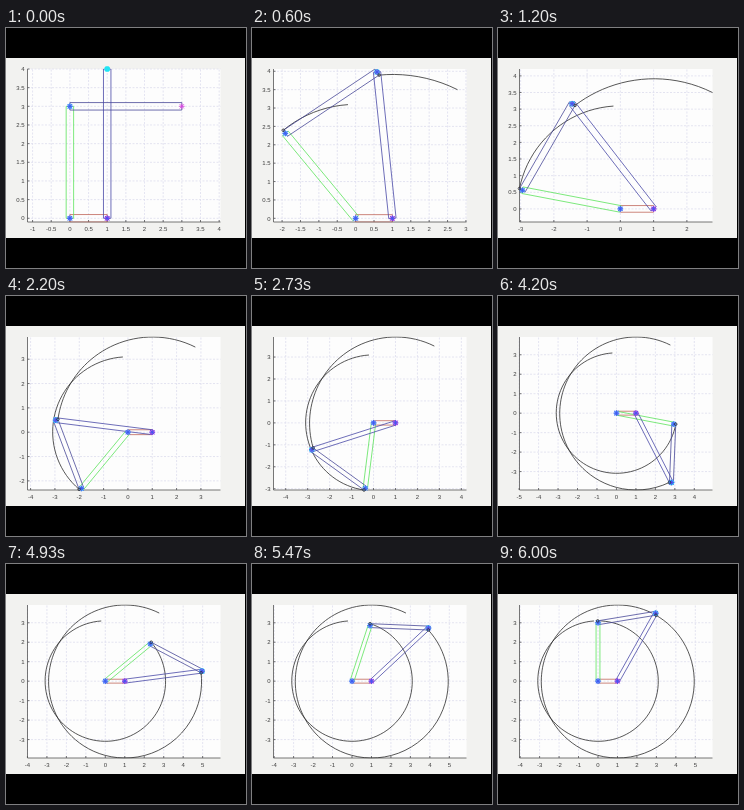
These frames come from a looping animation (240x240 px, 6.07 s). An HTML page:

```html
<!DOCTYPE html>
<html lang="en">
<head>
<meta charset="utf-8">
<title>Four-bar linkage</title>
<style>
  html, body { margin: 0; width: 100%; height: 100%; overflow: hidden; background: #000; }
  svg { display: block; width: 100vw; height: 100vh; }
  text { font: 6px "Liberation Sans", Arial, sans-serif; fill: #3a3a3a; }
  path, polyline, circle { fill: none; }
  .grid { stroke: #dedeee; stroke-width: .8; stroke-dasharray: 2 1.5; }
  .axis { stroke: #555; stroke-width: .8; }
  .trace { stroke: #2c2c2c; stroke-width: .8; }
  .bar { stroke-width: .8; }
</style>
</head>
<body>
<svg viewBox="0 0 240 240">
  <rect width="240" height="240" fill="#000"/>
  <rect y="30" width="239" height="180" fill="#f2f2f0"/>
  <rect x="21.5" y="41" width="193" height="153" fill="#fdfdfd"/>
  <clipPath id="box"><rect x="21" y="40.5" width="194" height="154"/></clipPath>
  <g id="axes"></g>
  <g id="plot" clip-path="url(#box)"></g>
  <g id="marks"></g>
</svg>
<script>
const LOOP = 6070, TICK = 200 / 3, STEPS = 100;
const BOX = { x: 21.5, y: 41, w: 193, h: 153 };
const CRANK = 3, COUPLER = 3, ROCKER = 4, HALF = 0.1;
const ORIGIN = [0, 0], PIVOT = [1, 0];

// Simulation step reached at selected ticks
const PACE = [[0, 0], [1, 2], [18, 22], [33, 39], [50, 58], [63, 72], [74, 86], [87, 100], [90, 100]];

const axes = document.getElementById('axes');
const plot = document.getElementById('plot');
const marks = document.getElementById('marks');

function stepAt(tick) {
  const i = Math.max(1, PACE.findIndex(p => p[0] >= tick));
  const [a, m] = PACE[i - 1], [b, n] = PACE[i];
  return Math.round(m + (n - m) * (tick - a) / (b - a));
}

function pose(n) {
  const angle = Math.PI / 2 + n / STEPS * 2 * Math.PI;
  const A = [CRANK * Math.cos(angle), CRANK * Math.sin(angle)];
  const dx = PIVOT[0] - A[0], dy = PIVOT[1] - A[1], d = Math.hypot(dx, dy);
  const along = (COUPLER ** 2 - ROCKER ** 2 + d * d) / (2 * d);
  const off = Math.sqrt(COUPLER ** 2 - along ** 2);
  const B = [A[0] + (dx * along - dy * off) / d, A[1] + (dy * along + dx * off) / d];
  return { A, B };
}

function corners(p, q) {
  const dx = q[0] - p[0], dy = q[1] - p[1], k = HALF / Math.hypot(dx, dy);
  const nx = -dy * k, ny = dx * k;
  return [[p[0] + nx, p[1] + ny], [q[0] + nx, q[1] + ny],
          [q[0] - nx, q[1] - ny], [p[0] - nx, p[1] - ny]];
}

// Two opposite coupler corners leave the trails
const trail = Array.from({ length: STEPS }, (_, i) => {
  const { A, B } = pose(i + 1), c = corners(A, B);
  return [c[0], c[2]];
});

// Tight equal axes: fit the data, then widen the looser direction
function fit(points) {
  const xs = points.map(p => p[0]), ys = points.map(p => p[1]);
  const x0 = Math.min(...xs), x1 = Math.max(...xs);
  const y0 = Math.min(...ys), y1 = Math.max(...ys);
  const scale = Math.min(BOX.w / (x1 - x0), BOX.h / (y1 - y0));
  const cx = (x0 + x1) / 2, cy = (y0 + y1) / 2;
  return {
    scale, cx, cy,
    X: x => BOX.x + BOX.w / 2 + (x - cx) * scale,
    Y: y => BOX.y + BOX.h / 2 - (y - cy) * scale
  };
}

function ticks(mid, span) {
  const step = span < 5.4 ? 0.5 : 1, out = [];
  const lo = mid - span / 2 - 0.02, hi = mid + span / 2 + 0.02;
  for (let v = Math.ceil(lo / step) * step; v <= hi; v += step) out.push(v);
  return out;
}

function drawAxes(v) {
  const right = BOX.x + BOX.w, bottom = BOX.y + BOX.h;
  let grid = '', notch = `M${BOX.x} ${BOX.y}V${bottom}H${right}`, text = '';
  for (const t of ticks(v.cx, BOX.w / v.scale)) {
    const x = v.X(t);
    grid += `M${x} ${bottom}V${BOX.y}`;
    notch += `M${x} ${bottom}v-2`;
    text += `<text x="${x}" y="203" text-anchor="middle">${t || 0}</text>`;
  }
  for (const t of ticks(v.cy, BOX.h / v.scale)) {
    const y = v.Y(t);
    grid += `M${BOX.x} ${y}H${right}`;
    notch += `M${BOX.x} ${y}h2`;
    text += `<text x="18.5" y="${y + 2.2}" text-anchor="end">${t || 0}</text>`;
  }
  axes.innerHTML = `<path class="grid" d="${grid}"/><path class="axis" d="${notch}"/>${text}`;
}

function star(v, p, color, width = 0.9) {
  const x = v.X(p[0]), y = v.Y(p[1]), r = 2.8, d = 2.1;
  return `<path stroke="${color}" stroke-width="${width}" d="M${x - r} ${y}h${2 * r}M${x} ${y - r}v${2 * r}` +
    `M${x - d} ${y - d}l${2 * d} ${2 * d}M${x - d} ${y + d}l${2 * d} ${-2 * d}"/>`;
}

function draw(n) {
  // The links start apart and snap together on the first step
  const { A, B } = n ? pose(n) : { A: [0, 3], B: [3, 3] };
  const tip = n ? B : [1, 4];
  const bars = [
    [corners(ORIGIN, PIVOT), '#c0685c'],
    [corners(ORIGIN, A), '#5ce45c'],
    [corners(A, B), '#4a4a98'],
    [corners(PIVOT, tip), '#4a4aa8']
  ];
  const past = trail.slice(0, n);
  const v = fit([...bars.flatMap(b => b[0]), ...past.flat()]);
  const line = pts => pts.map(p => v.X(p[0]).toFixed(2) + ',' + v.Y(p[1]).toFixed(2)).join(' ');

  drawAxes(v);
  plot.innerHTML =
    [0, 1].map(i => `<polyline class="trace" points="${line(past.map(p => p[i]))}"/>`).join('') +
    bars.map(([c, color]) => `<polyline class="bar" stroke="${color}" points="${line([...c, c[0]])}"/>`).join('');

  const blue = '#4058f0', pink = '#d848e0';
  const joint = (p, under) => star(v, p, under, 1.3) + star(v, p, blue);
  const pens = past.slice(-1).flat().map(p =>
    `<circle class="trace" cx="${v.X(p[0])}" cy="${v.Y(p[1])}" r="1.3"/>`);
  marks.innerHTML =
    star(v, tip, '#20e4f4', 2) + star(v, B, pink) + (n ? star(v, B, blue) : '') +
    joint(ORIGIN, '#70a8ff') + joint(PIVOT, pink) + joint(A, '#60c0ff') + pens.join('');
}

let shown = -1;
function frame() {
  const t = performance.now() % LOOP;
  const n = stepAt(Math.min(90, Math.floor((t + 3.4) / TICK)));
  if (n !== shown) draw(shown = n);
  requestAnimationFrame(frame);
}
frame();
</script>
</body>
</html>
```
